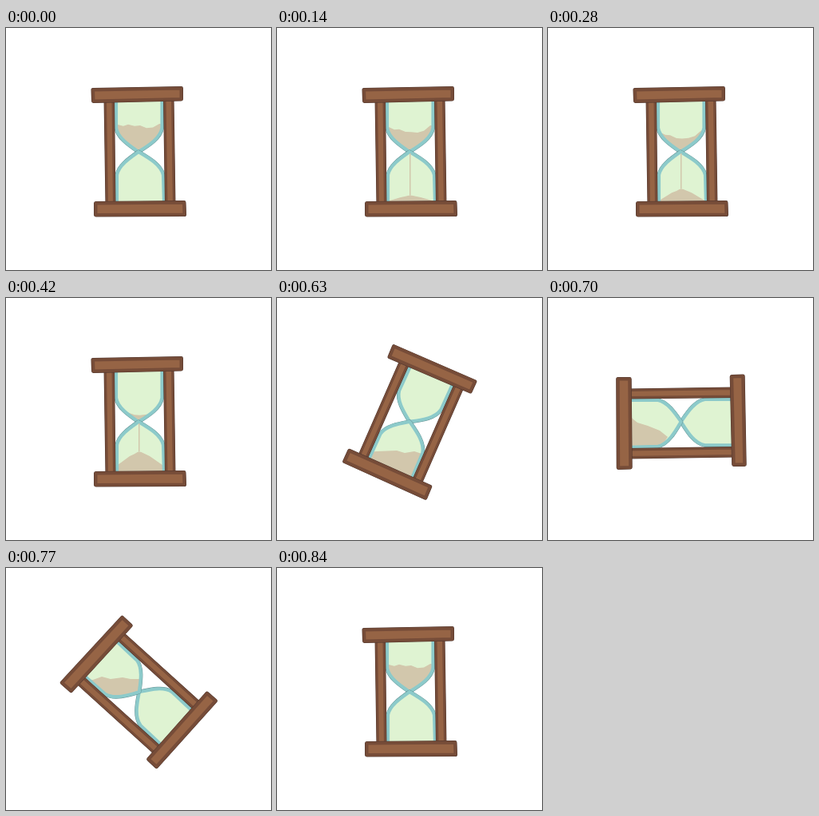
An HTML page with a canvas for the animation above (0.91 s loop, 332 by 303 pixels).

```html
<!DOCTYPE html>
<html>
<head>
<meta charset="utf-8">
<style>
html, body { margin: 0; overflow: hidden; background: #fff; }
canvas { display: block; }
</style>
</head>
<body>
<canvas width="332" height="303"></canvas>
<script>
const ctx = document.querySelector('canvas').getContext('2d');
const STEP = 70, STEPS = 13, FALL = 8;
const SAND = '#d2c7ac', GLASS = '#dff3d2', RIM = '#8ccaca', WOOD = '#966445', EDGE = '#764c38';

const upper = new Path2D('M138 91V125C140 138 156 148 166 155C177 148 193 139 195.500 125V91');
const lower = new Path2D('M139 219V184C141 172 156 162 166 155C178 162 194 171 197 184L198 219');
const bars = ['109 77.500L219.500 75.500V89L109.500 91.500Z', '112.500 219.500L223 218.500L223.500 233.500L112.500 234Z'];
const pillars = ['124.500 88H134L135.500 222H126.500Z', '199 88H208.500L210.500 222H201Z'];

// Tilted poses: angle and the sand outline in stage coordinates
const tilts = [
  [24.5, 'M100 194L125 192L150 191L160 194L172 192L185 196V240H100Z'],
  [90, 'M100 145L107 152L112 156L125 160L140 166L150 174L138 192H100Z'],
  [133, 'M95 139L109 140L120 136L131 139L146 137L156 139L172 139V170H95Z']
];

function outline(path, color, width) {
  ctx.strokeStyle = color;
  ctx.lineWidth = width;
  ctx.stroke(path);
}

function wood(shape, width) {
  const path = new Path2D('M' + shape);
  outline(path, '#4e352d', width + 1);
  ctx.fillStyle = WOOD;
  ctx.fill(path);
  outline(path, EDGE, width);
}

function bulb(path, angle, sand) {
  outline(path, '#608e90', 5);
  ctx.fillStyle = GLASS;
  ctx.fill(path);
  if (sand) {
    ctx.save();
    ctx.clip(path);
    rotate(-angle);
    ctx.fillStyle = SAND;
    ctx.fill(new Path2D(sand));
    ctx.restore();
  }
  outline(path, RIM, 4.2);
}

function rotate(degrees) {
  ctx.translate(166.4, 155.3);
  ctx.rotate(degrees * Math.PI / 180);
  ctx.translate(-166.4, -155.3);
}

function topSand(p) {
  if (p === 1) return '';
  const edge = 120 + 33 * p * p, mid = 123 + 32 * p;
  const at = (k, bump) => edge + (mid - edge) * k + bump * (1 - p);
  return `M136 ${edge}L147 ${at(.45, 1.5)}L153 ${at(.6, -1)}L161 ${at(.9, 0)}L168 ${at(1, -1)}` +
    `L176 ${at(.75, 3)}L184 ${at(.5, 3)}L192 ${edge}H198V156H136Z`;
}

function bottomSand(p) {
  if (!p) return '';
  const peak = 216 - 33 * p ** 1.2, edge = 217 - Math.max(0, p - .5) * 26;
  const at = k => peak + (edge - peak) * k;
  return `M138 ${edge}L155 ${at(.3)}L161 ${at(.15)}L165 ${peak}H169L180 ${at(.3)}L198 ${edge}V219H138Z`;
}

function draw(step) {
  const tilt = tilts[step - FALL - 1];
  const angle = tilt ? tilt[0] : 0;
  const p = step > FALL ? 0 : step / FALL;
  ctx.fillStyle = '#fff';
  ctx.fillRect(0, 0, 332, 303);
  ctx.save();
  ctx.lineJoin = 'round';
  rotate(angle);
  bulb(upper, angle, tilt ? '' : topSand(p));
  bulb(lower, angle, tilt ? tilt[1] : bottomSand(p));
  if (p > 0 && p < 1) {
    ctx.fillStyle = SAND;
    ctx.fillRect(166, 157, 1.5, 59 - 33 * p ** 1.2);
  }
  pillars.forEach(shape => wood(shape, 3));
  bars.forEach(shape => wood(shape, 4));
  ctx.restore();
}

function tick() {
  draw(Math.floor(performance.now() / STEP) % STEPS);
  requestAnimationFrame(tick);
}
tick();
</script>
</body>
</html>
```
